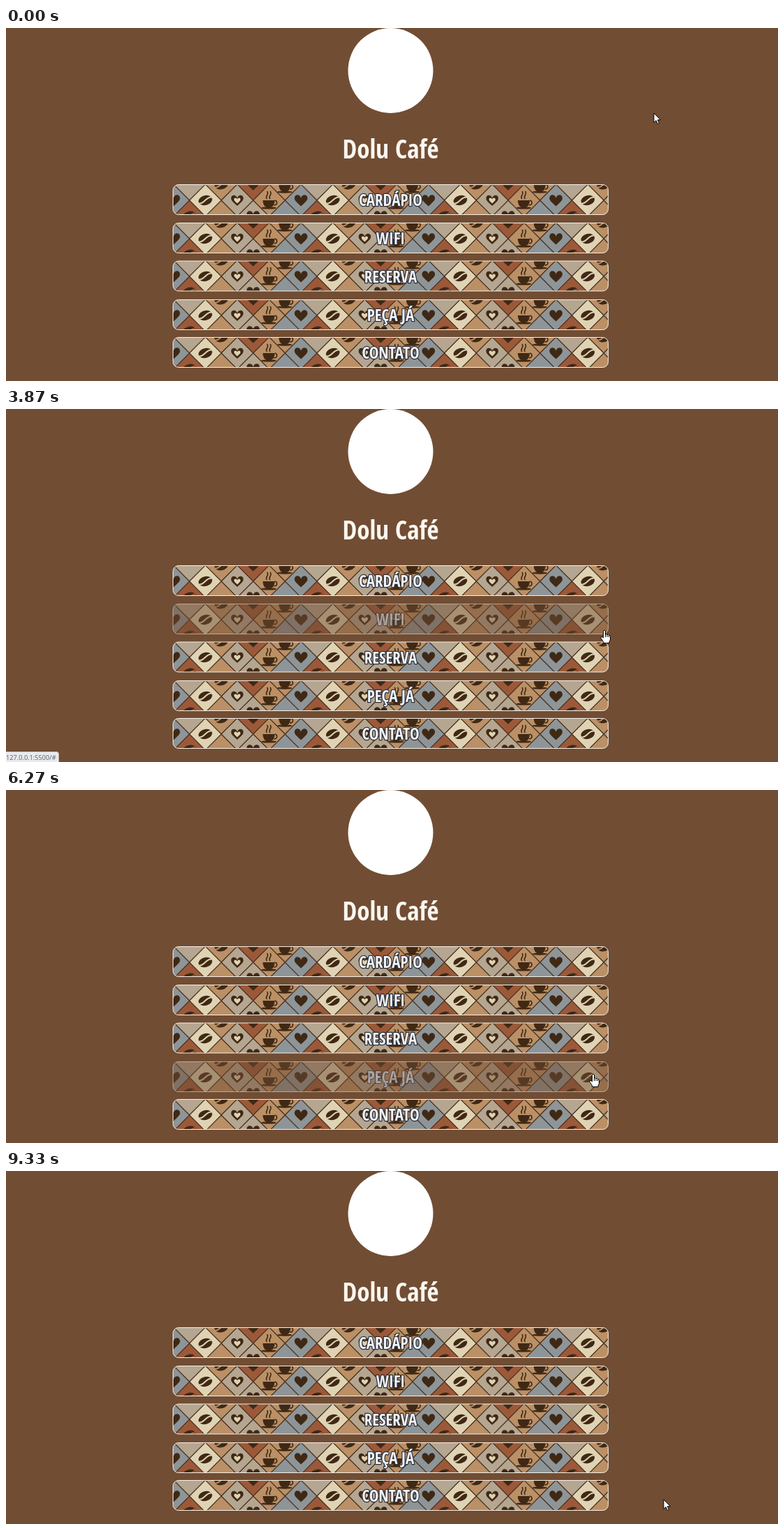
These frames come from a looping animation (1107x506 px, 9390 ms). An HTML page with a canvas:

```html
<!DOCTYPE html>
<html lang="pt">
<head>
<meta charset="utf-8">
<title>Dolu Café</title>
<style>
html, body { margin: 0; width: 100%; height: 100%; overflow: hidden; background: #714d33; }
canvas { display: block; }
</style>
</head>
<body>
<canvas id="stage" width="1107" height="506"></canvas>
<script>
const ctx = document.getElementById('stage').getContext('2d');
const LOOP = 9390, STEP = 1000 / 15;
const BG = '#714d33', INK = '#3f2915';
const GRAY = '#8e9598', CREAM = '#e0d3b4', TAUPE = '#b5a691', ORANGE = '#bb9066', RUST = '#9c5939';
const LEFT = 239, WIDTH = 625, HEIGHT = 44, MID = 551.5;
const CONDENSED = "'Open Sans Condensed', 'Open Sans', 'Noto Sans', sans-serif";

const buttons = [
  { label: 'CARDÁPIO', y: 224, on: 1265, off: 2240 },
  { label: 'WIFI', y: 279, on: 3330, off: 3940 },
  { label: 'RESERVA', y: 333.5, on: 4470, off: 5583 },
  { label: 'PEÇA JÁ', y: 389, on: 6070, off: 7030 },
  { label: 'CONTATO', y: 443, on: 7870, off: 8847 }
];

// time, x, y of the pointer's hot spot
const path = [
  [0, 929, 122], [600, 929, 122], [1267, 823, 223], [1530, 800, 240],
  [1960, 800, 240], [2530, 941, 273], [2800, 941, 273], [2867, 939, 283],
  [3330, 864, 300], [3600, 850, 308], [3867, 858, 317], [3940, 863, 323],
  [4200, 911, 342], [4470, 864, 346], [4800, 845, 347], [5130, 843, 356],
  [5400, 843, 356], [5600, 866, 362], [5800, 919, 385], [6070, 864, 402],
  [6330, 835, 408], [6840, 835, 408], [7400, 931, 462], [7630, 931, 462],
  [7870, 864, 460], [8130, 835, 462], [8640, 835, 462], [9320, 943, 471],
  [LOOP, 943, 471]
];

const clamp = v => Math.max(0, Math.min(1, v));

function heart(c, s, color) {
  c.fillStyle = color;
  c.beginPath();
  c.moveTo(0, s);
  c.bezierCurveTo(-s * 0.5, s * 0.5, -s * 1.1, s * 0.1, -s * 1.1, -s * 0.35);
  c.bezierCurveTo(-s * 1.1, -s * 1.05, -s * 0.2, -s * 1.1, 0, -s * 0.4);
  c.bezierCurveTo(s * 0.2, -s * 1.1, s * 1.1, -s * 1.05, s * 1.1, -s * 0.35);
  c.bezierCurveTo(s * 1.1, s * 0.1, s * 0.5, s * 0.5, 0, s);
  c.fill();
}

const icons = {
  heart(c) { heart(c, 8.5, INK); },
  ring(c) { heart(c, 8, INK); c.translate(0, 0.3); heart(c, 4.2, CREAM); },
  bean(c, paper) {
    c.rotate(-0.25);
    c.fillStyle = INK;
    c.beginPath();
    c.ellipse(0, 0, 10, 7, 0, 0, 7);
    c.fill();
    c.strokeStyle = paper;
    c.lineWidth = 2;
    c.beginPath();
    c.moveTo(-10, 2);
    c.bezierCurveTo(-3, 5, 2, -5, 10, -2);
    c.stroke();
  },
  cup(c) {
    c.fillStyle = c.strokeStyle = INK;
    c.beginPath();
    c.moveTo(-9, 0);
    c.lineTo(8, 0);
    c.bezierCurveTo(8, 6, 5, 10, 2, 10);
    c.lineTo(-3, 10);
    c.bezierCurveTo(-6, 10, -9, 6, -9, 0);
    c.fill();
    c.beginPath();
    c.ellipse(-0.5, 11, 11, 1.6, 0, 0, 7);
    c.fill();
    c.lineWidth = 1.6;
    c.beginPath();
    c.arc(8, 3.5, 3.2, -1.6, 1.9);
    for (const x of [-3, 1.5]) {
      c.moveTo(x, -2);
      c.bezierCurveTo(x - 4, -6, x + 4, -8, x, -13);
    }
    c.stroke();
  }
};

function makePattern() {
  const strip = document.createElement('canvas');
  strip.width = WIDTH;
  strip.height = 45;
  const c = strip.getContext('2d'), size = 45.7, half = size / 2;
  const rows = [
    { dy: -half, dx: half, colors: [TAUPE, ORANGE, RUST, ORANGE], marks: ['', 'bean', 'heart', 'cup'] },
    { dy: half, dx: half, colors: [RUST, ORANGE, TAUPE, GRAY], marks: ['bean', '', 'heart', ''] },
    { dy: 0, dx: 0, colors: [GRAY, CREAM, TAUPE, ORANGE], marks: ['heart', 'bean', 'ring', 'cup'] }
  ];
  for (const row of rows) {
    for (let k = -1; k < 15; k++) {
      const n = (k + 4) % 4;
      c.save();
      c.translate(1.2 + k * size + row.dx, 23 + row.dy);
      c.beginPath();
      c.moveTo(-half, 0);
      c.lineTo(0, -half);
      c.lineTo(half, 0);
      c.lineTo(0, half);
      c.closePath();
      c.fillStyle = row.colors[n];
      c.fill();
      c.strokeStyle = '#4a3320';
      c.lineWidth = 1.1;
      c.stroke();
      if (row.marks[n]) icons[row.marks[n]](c, row.colors[n]);
      c.restore();
    }
  }
  return strip;
}

// Largest size up to max at which the line stays within the given room
function fitFont(text, style, max, room) {
  ctx.font = `${style} 100px ${CONDENSED}`;
  const size = Math.min(max, 100 * room / ctx.measureText(text).width);
  return `${style} ${size}px ${CONDENSED}`;
}

const pattern = makePattern();
const titleFont = fitFont('Dolu Café', '300 condensed', 49, 138);
const labelFont = fitFont('CARDÁPIO', '400 condensed', 26, 91);

function drawButton(b, t) {
  ctx.save();
  ctx.globalAlpha = t >= b.on && t < b.off ? 0.5 : 1;
  ctx.beginPath();
  ctx.roundRect(LEFT + 0.5, b.y + 0.5, WIDTH - 1, HEIGHT - 1, 8);
  ctx.save();
  ctx.clip();
  ctx.drawImage(pattern, LEFT, Math.floor(b.y));
  ctx.restore();
  ctx.strokeStyle = '#f6f1ea';
  ctx.lineWidth = 1;
  ctx.stroke();
  ctx.font = labelFont;
  ctx.lineJoin = 'round';
  ctx.lineWidth = 2.4;
  ctx.strokeStyle = '#2c303a';
  ctx.strokeText(b.label, MID, b.y + 31);
  ctx.fillStyle = '#f1f5fb';
  ctx.fillText(b.label, MID, b.y + 31);
  ctx.restore();
}

function drawStatus(t) {
  let alpha = 0;
  for (const b of buttons) {
    const shown = clamp((t - b.on - 350) / 170);
    const hidden = clamp((t - b.off - 130) / 170);
    alpha = Math.max(alpha, shown * (1 - hidden));
  }
  if (!alpha) return;
  ctx.save();
  ctx.globalAlpha = alpha;
  ctx.beginPath();
  ctx.roundRect(-4, 491.5, 79.5, 20, 3);
  ctx.fillStyle = '#e9eaed';
  ctx.fill();
  ctx.strokeStyle = '#c3c1c0';
  ctx.lineWidth = 1;
  ctx.stroke();
  ctx.font = "9.2px 'Open Sans', 'Noto Sans', sans-serif";
  ctx.textAlign = 'left';
  ctx.fillStyle = '#5a5d62';
  ctx.fillText('127.0.0.1:5500/#', 0, 503);
  ctx.restore();
}

const arrow = new Path2D('M0 0V13.5L3.2 10.6 5.3 15.4 7.5 14.4 5.4 9.8H9.6Z');
const hand = new Path2D('M-1.5 1.2Q0 -1 1.5 1.2V6Q3 5 4 6.6 5.6 5.8 6.4 7.4 8.4 6.8 8.5 9V13Q8.4 15 7 16.5V18.5H-1.5V16.5L-5 11.5Q-5.4 9 -3 9.6L-1.5 11Z');
const knuckles = new Path2D('M1.5 6V10M4 7V10M6.4 8V10');

function drawPointer(t) {
  const i = Math.max(1, path.findIndex(p => p[0] > t));
  const [t0, x0, y0] = path[i - 1], [t1, x1, y1] = path[i];
  const u = clamp((t - t0) / (t1 - t0));
  const over = buttons.some(b => t > b.on + 60 && t < b.off);
  const shape = over ? hand : arrow;
  ctx.save();
  ctx.translate(Math.round(x0 + (x1 - x0) * u), Math.round(y0 + (y1 - y0) * u));
  ctx.fillStyle = '#fff';
  ctx.strokeStyle = '#000';
  ctx.lineWidth = 1;
  ctx.fill(shape);
  ctx.stroke(shape);
  if (over) ctx.stroke(knuckles);
  ctx.restore();
}

function draw(t) {
  ctx.fillStyle = BG;
  ctx.fillRect(0, 0, 1107, 506);
  ctx.fillStyle = '#fff';
  ctx.beginPath();
  ctx.arc(MID, 61, 61, 0, 7);
  ctx.fill();
  ctx.textAlign = 'center';
  ctx.font = titleFont;
  ctx.fillStyle = '#fbf7f1';
  ctx.fillText('Dolu Café', MID, 187);
  for (const b of buttons) drawButton(b, t);
  drawStatus(t);
  drawPointer(t);
}

function tick() {
  const t = performance.now() % LOOP;
  draw(Math.floor((t + 4) / STEP) * STEP);
  requestAnimationFrame(tick);
}
tick();
</script>
</body>
</html>
```
